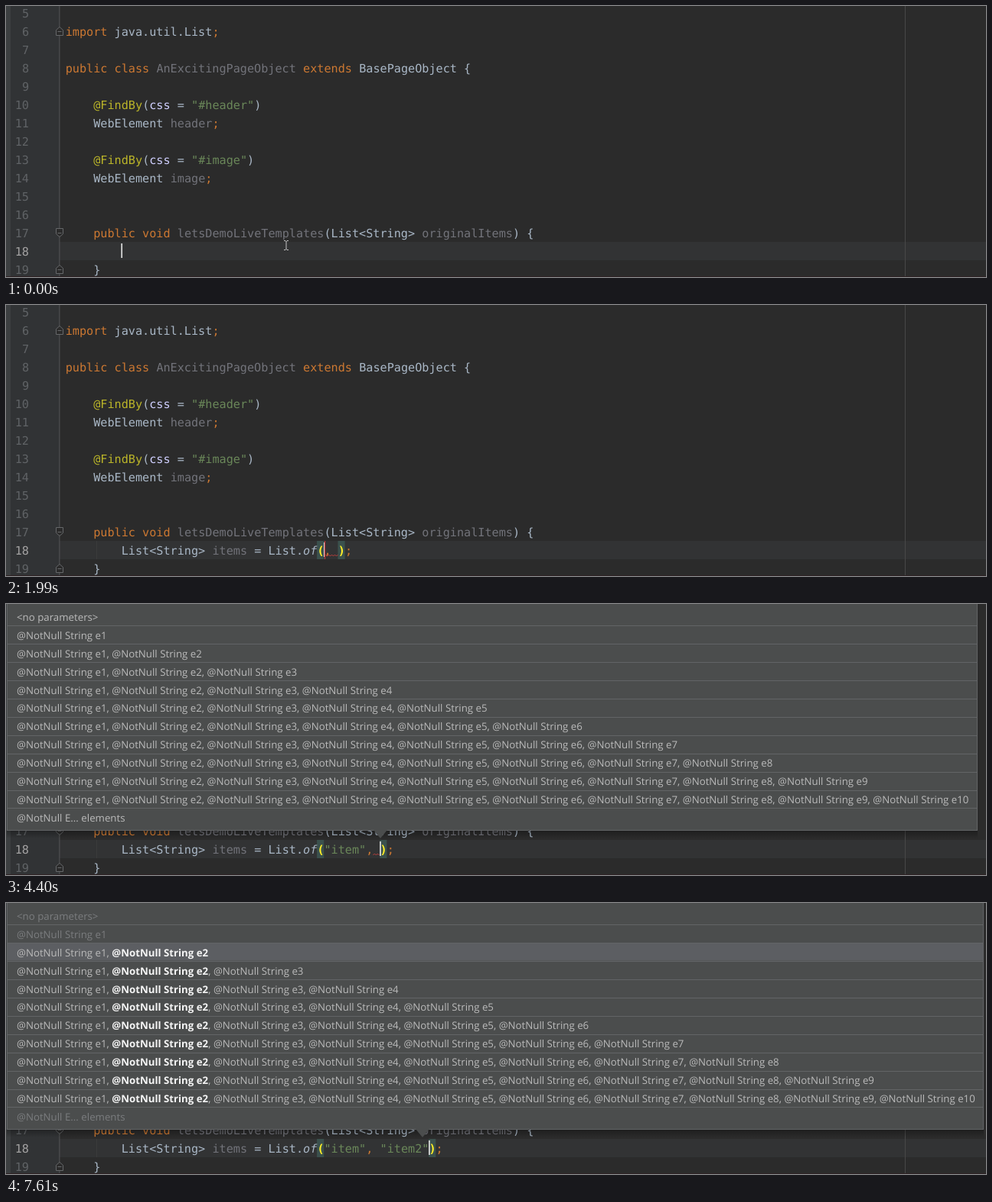
Recreate the animation shown at these times as an HTML page. Size 1280 by 355 pixels, loop 8000 ms.

```html
<!DOCTYPE html>
<html lang="en">
<head>
<meta charset="utf-8">
<title>Live template demo</title>
<style>
  html, body { margin: 0; width: 100%; height: 100%; overflow: hidden; background: #2b2b2b; }
  svg { display: block; width: 1280px; height: 355px; }
  text { white-space: pre; text-rendering: geometricPrecision; }
  .code text { font: 15.17px "DejaVu Sans Mono", monospace; fill: #a9b7c6; }
  .code .k { fill: #cc7832; }
  .code .s { fill: #6a8759; }
  .code .a { fill: #bbb529; }
  .code .p { fill: #d0d0ff; }
  .code .u { fill: #72737a; }
  .code .n { fill: #606366; text-anchor: end; }
  .code .now { fill: #a4a3a3; }
  .code .i { font-style: italic; }
  .code .m { fill: #589df6; }
  .code .w { fill: #bbbbbb; }
  .code .g { fill: #8a8c8e; }
  .code .b { fill: #ffef28; font-weight: bold; }
  .hint text { font: 13.28px "Open Sans", "Noto Sans", sans-serif; fill: #bbbbbb; }
  .hint .dim { fill: #7b7d7f; }
  .hint .bold { fill: #f4f4f4; font-weight: 700; }
</style>
</head>
<body>
<svg viewBox="0 0 1280 355" xmlns="http://www.w3.org/2000/svg">
  <defs>
    <linearGradient id="shade" x2="0" y2="1">
      <stop offset="0" stop-opacity=".3"/>
      <stop offset="1" stop-opacity="0"/>
    </linearGradient>
  </defs>
  <rect width="1280" height="355" fill="#2b2b2b"/>
  <rect width="70" height="355" fill="#313335"/>
  <rect width="6" height="355" fill="#3c3f41"/>
  <rect x="70" y="309" width="1210" height="24" fill="#323334"/>
  <rect x="1174" width="1" height="355" fill="#484848"/>
  <rect x="69.4" width="1" height="355" fill="#555657"/>
  <g id="page" class="code"></g>
  <g id="line" class="code"></g>
  <rect y="354" width="1280" height="1" fill="#2e2224"/>
  <g id="list" class="code"></g>
  <g id="hint" class="hint"></g>
</svg>
<script>
const LOOP = 8000, CHAR = 9.13, LEFT = 77.7, ARG = 37, PAD = 14, STEP = 124.25, ROW = 23.93;
const byId = id => document.getElementById(id);
const colX = col => +(LEFT + col * CHAR).toFixed(2);
const baseY = line => (line - 5) * 24 + 14.5;
const esc = s => s.replace(/&/g, '&amp;').replace(/</g, '&lt;');
const label = (x, y, s, cls = '') => `<text x="${x}" y="${y}" class="${cls}">${esc(s)}</text>`;
const box = (x, y, w, h, fill) => `<rect x="${x}" y="${y}" width="${w}" height="${h}" fill="${fill}"/>`;

// Tokens are [class, text] pairs laid out on the character grid.
function tokens(line, col, parts) {
  let out = '';
  for (const [cls, s] of parts) {
    out += label(colX(col), baseY(line), s, cls);
    col += s.length;
  }
  return out;
}

function fold(line, up) {
  const d = up ? 'M70 27.5l4.5 4v7h-9v-7z' : 'M70 38.5l4.5-4v-7h-9v7z';
  return `<g transform="translate(0 ${(line - 6) * 24})" fill="#2b2b2b" stroke="#66686a">
    <path d="${d}"/><path d="M67.5 33.5h5"/></g>`;
}

function drawPage() {
  const field = (line, name) =>
    tokens(line, 4, [['a', '@FindBy'], ['', '('], ['p', 'css'], ['', ' = '], ['s', `"#${name}"`], ['', ')']]) +
    tokens(line + 1, 4, [['', 'WebElement '], ['u', name], ['k', ';']]);
  let out = '';
  for (let n = 5; n < 20; n++) out += label(30, baseY(n), String(n), n === 18 ? 'n now' : 'n');
  out += tokens(6, 0, [['k', 'import '], ['', 'java.util.List'], ['k', ';']]);
  out += tokens(8, 0, [['k', 'public class '], ['u', 'AnExcitingPageObject'], ['k', ' extends '], ['', 'BasePageObject {']]);
  out += field(10, 'header') + field(13, 'image');
  out += tokens(17, 4, [['k', 'public void '], ['u', 'letsDemoLiveTemplates'], ['', '(List<String> '], ['u', 'originalItems'], ['', ') {']]);
  out += tokens(19, 4, [['', '}']]);
  return out + fold(6, true) + fold(17, false) + fold(19, true);
}

// [time, arguments, caret offset, brackets lit]
const EDITS = [
  [1680, ', ', 0, true],
  [2220, '"", ', 1, true],
  [2300, '"", ', 1],
  [2770, '"i", ', 2],
  [2930, '"it", ', 3],
  [3000, '"ite", ', 4],
  [3320, '"item", ', 5],
  [4190, '"item", ', 8, true],
  [5420, '"item", ""', 9],
  [6280, '"item", "i"', 10],
  [6360, '"item", "it"', 11],
  [6440, '"item", "ite"', 12],
  [6600, '"item", "item"', 13],
  [6740, '"item", "item2"', 14],
  [7610, '"item", "item2"', 15, true]
];

const typed = t => 'list'.slice(0, [380, 520, 750, 830].filter(at => t >= at).length);
const caret = col => box(colX(col) - 0.4, 311, 1.7, 19, '#dddddd');

function squiggle(from, to) {
  let d = `M${colX(from)} 329`;
  for (let x = 2, up = true; x <= (to - from) * CHAR; x += 2, up = !up) d += `l2 ${up ? -2 : 2}`;
  return `<path d="${d}" fill="none" stroke="#bc3f3c"/>`;
}

function drawCall(t) {
  const [, args, pos, lit] = EDITS.filter(e => t >= e[0]).pop();
  const close = ARG + args.length, comma = ARG + args.indexOf(',');
  const cls = lit ? 'b' : '';
  let out = box(118, 309, 1, 24, '#3a3b3b');
  if (lit) for (const c of [ARG - 1, close]) out += box(colX(c) - 0.3, 309, CHAR, 24, '#3b514d');
  const inner = args.match(/"\w*"|, /g).map(s => [s[0] === '"' ? 's' : 'k', s]);
  out += tokens(18, 8, [
    ['', 'List<String> '], [t < 1990 ? '' : 'u', 'items'], ['', ' = List.'], ['i', 'of'],
    [cls, '('], ...inner, [cls, ')'], ['k', ';']
  ]);
  if (t >= 1920 && t < 5880) out += squiggle(comma + (t < 2560 ? 0 : 1), comma + 2);
  out += caret(ARG + pos);
  if (t < 4190) {
    const w = Math.max(0.1, (comma - ARG) * CHAR);
    out += `<rect x="${colX(ARG) + 1}" y="309.5" width="${w}" height="23" fill="none" stroke="#c83a3a"/>`;
  }
  if (t >= 5180 && t < 5420)
    out += '<circle cx="94.5" cy="314" r="5" fill="#e0a93f"/>' + box(92, 320, 5, 4, '#9a9da0');
  return out;
}

function drawLine(t) {
  if (t >= 1680) return drawCall(t);
  const word = typed(t);
  let out = label(colX(8), baseY(18), word);
  if (t < 1540) out += caret(8 + word.length);
  if (t < 380)
    out += '<path d="M363 307.5h2l1 1l1-1h2M366 308v11M363 319.5h2l1-1l1 1h2" fill="none" stroke="#c4c4c4"/>';
  return out;
}

function drawList(t) {
  if (t < 600 || t >= 1610) return '';
  const word = typed(t), x = 150.2, y = 348.5;
  return box(119, 331, 573, 24, '#5a5d5f') + box(120, 332, 571, 23, '#505356') +
    label(x, y, word, 'm') +
    label(x + word.length * CHAR, y, 'listof'.slice(word.length), 'w') +
    label(614.7, y, 'List.of', 'g');
}

function drawHint(t) {
  if (t < 4400) return '';
  const second = t >= 4630, right = second ? 1277 : 1269;
  const tip = t < 5880 ? 489 : t < 7120 ? 498 : 544;
  const edge = '#626466', fill = '#4b4d4d';
  let out = box(1, 297, right - 1, 10, 'url(#shade)') +
    box(1, -2, right - 1, 299, edge) + box(2, -2, right - 3, 298, fill) +
    `<path d="M${tip - 9} 296h18l-9 11z" fill="${fill}"/>`;
  if (second) out += box(2, 52, right - 3, 23.5, '#5c5e62');
  for (let r = 0; r < 12; r++) {
    const y = Math.round(21.8 + r * ROW);
    if (r) out += box(2, Math.round(4.2 + r * ROW), right - 3, 1, edge);
    const dim = second && (r < 2 || (r === 11 && t >= 5880)) ? 'dim' : '';
    if (r === 0 || r === 11) {
      out += label(PAD, y, r ? '@NotNull E... elements' : '<no parameters>', dim);
      continue;
    }
    for (let k = 1; k <= r; k++) {
      const bold = second && k === 2;
      const x = PAD + (k - 1) * STEP + (second && k > 2 ? 8.4 : 0);
      const end = k < r ? ',' : '';
      const name = `@NotNull String e${k}`;
      out += bold
        ? `<text x="${x}" y="${y}"><tspan class="bold">${name}</tspan>${end}</text>`
        : label(x, y, name + end, dim);
    }
  }
  return out;
}

const layers = { line: drawLine, list: drawList, hint: drawHint };
const shown = {};

function render(t) {
  for (const id in layers) {
    const markup = layers[id](t);
    if (shown[id] !== markup) byId(id).innerHTML = shown[id] = markup;
  }
}

byId('page').innerHTML = drawPage();
const start = performance.now();
function tick() {
  render((performance.now() - start) % LOOP);
  requestAnimationFrame(tick);
}
tick();
</script>
</body>
</html>
```
